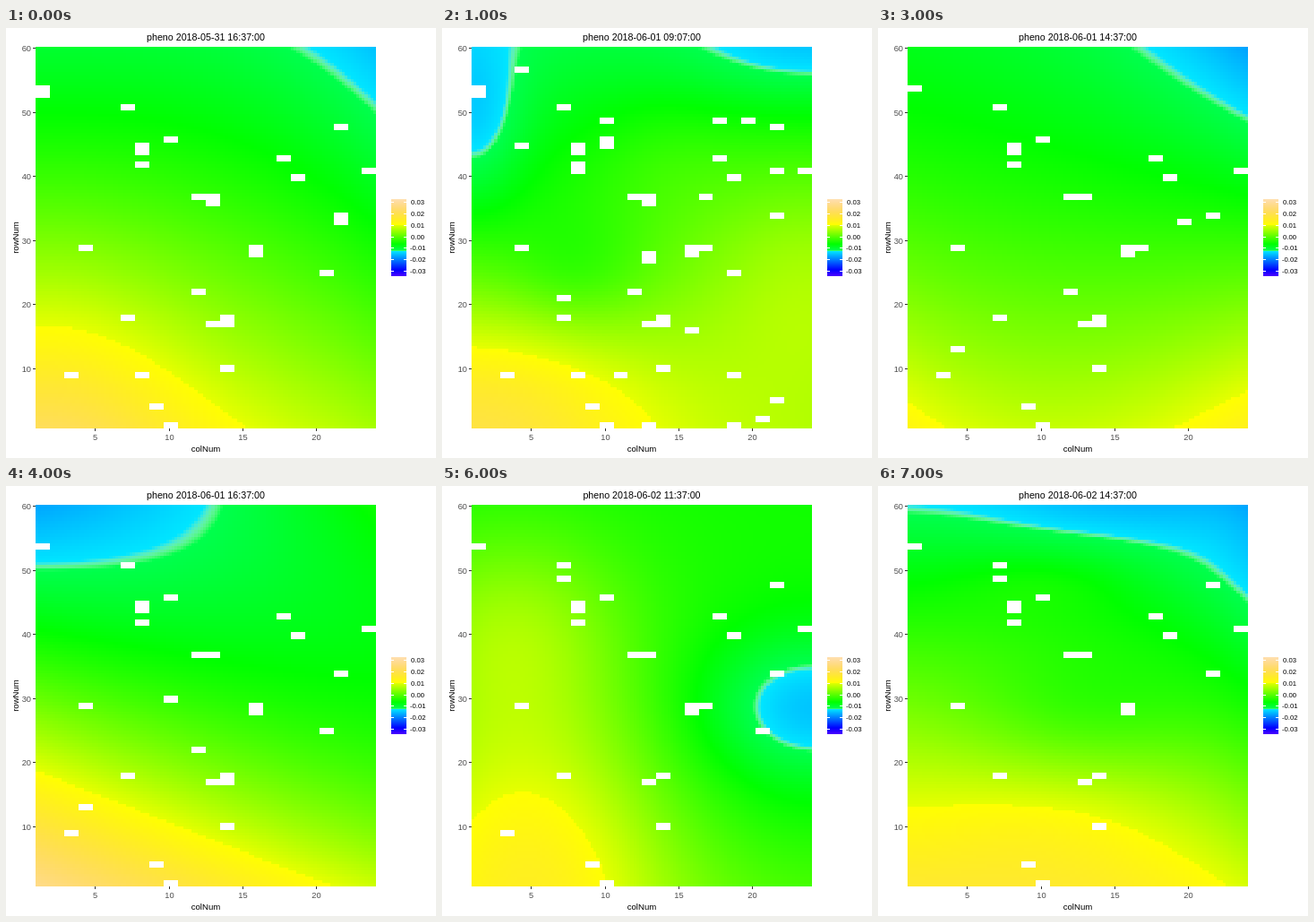
An HTML page with a canvas that plays this animation: 480 by 480 pixels, repeating every 8 s.

```html
<!DOCTYPE html>
<html lang="en">
<head>
<meta charset="utf-8">
<title>Field heat map</title>
<style>
  html, body { margin: 0; width: 100%; height: 100%; overflow: hidden; background: #fff; }
  canvas, svg { position: absolute; left: 0; top: 0; width: 480px; height: 480px; }
  text { font-family: "Liberation Sans", Arial, sans-serif; }
  .tick { font-size: 9.3px; fill: #4d4d4d; }
  .key { font-size: 7.7px; }
  .axis { font-size: 9.6px; text-anchor: middle; }
  #title { font-size: 10.7px; text-anchor: middle; }
</style>
</head>
<body>
<canvas id="map" width="480" height="480"></canvas>
<svg id="axes" viewBox="0 0 480 480">
  <text id="title" x="223" y="14"></text>
  <text class="axis" x="223" y="473">colNum</text>
  <text class="axis" transform="translate(14 234) rotate(-90)">rowNum</text>
</svg>
<script>
const HOLD = 1000, N = 120;
const X = 33.3, Y = 21.45, W = 380, H = 426, COLS = 24, ROWS = 60;

// Empty plots as "column,row"
const always = "1,54 7,51 8,45 8,44 8,42 10,46 18,43 19,40 24,41 12,37 13,37 " +
  "22,34 4,29 16,29 16,28 7,18 14,18 13,17 14,10 9,4 10,1 ";
const early = always + "12,22 14,17 3,9 ";

const { exp } = Math;
const bump = (x, y, w, h) => exp(-((x / w) ** 2) - (y / h) ** 2);

// Each field gives a scale position (0-100) at u to the right and v downward, both 0..1.
const scenes = [
  { time: "2018-05-31 16:37:00",
    gaps: early + "1,53 22,48 13,36 22,33 21,25 8,9",
    field: (u, v) => 36.5 - 8 * u ** 3 + 26 * v + (21 * exp(-((u / 0.45) ** 2)) + 5 * u) * v * v },
  { time: "2018-06-01 09:07:00",
    gaps: early + "1,53 4,57 10,49 18,49 20,49 22,48 4,45 10,45 8,41 22,41 13,36 17,37 17,29 " +
      "13,28 13,27 19,25 7,21 16,16 8,9 11,9 19,9 13,1 19,1 21,2 22,5",
    field: (u, v) => 35 + 22 * v
      + 12 * bump(u - 1, v - 0.57, 0.4, 0.37) - 7 * bump(u - 1, v, 0.35, 0.15)
      + 22 * bump(u, v - 1, 0.57, 0.33) - 9.5 * bump(u, v - 0.21, 0.155, 0.24)
      - 5 * bump(u - 0.3, v - 0.6, 0.2, 0.15) + 4 * bump(u - 0.55, v - 0.28, 0.25, 0.2) },
  { time: "2018-06-01 11:37:00", gaps: early + "22,48 17,29" },
  { time: "2018-06-01 14:37:00",
    gaps: early + "20,33 17,29 4,13",
    field: (u, v) => 39 - 5 * u - 9 * u ** 3 + (31 - 28 * u + 44 * u * u) * v
      - (7 + 10 * (1 - u) ** 4) * v * (1 - v) },
  { time: "2018-06-01 16:37:00",
    gaps: early + "10,30 21,25 4,13",
    field: (u, v) => 25.5 + 10 * u + 7.5 * u * u + (67 - 46 * u) * v - (26 + 18 * u) * v * (1 - v) },
  { time: "2018-06-02 09:07:00", gaps: always + "7,49 22,48 17,29 3,9" },
  { time: "2018-06-02 11:37:00",
    gaps: always + "7,49 22,48 17,29 21,25 3,9",
    field: (u, v) => 44 + 8 * v
      + 21 * bump(u - 0.17, v - 1, 0.42, 0.5) + 11 * bump(u - 0.12, v - 0.32, 0.33, 0.27)
      - 11 * bump(u - 1, v - 0.53, 0.32, 0.18) - 9 * bump(u - 1, v - 0.62, 0.52, 0.38) },
  { time: "2018-06-02 14:37:00",
    gaps: always + "7,49 22,48",
    field: (u, v) => 32.5 + 43 * v - 10.5 * u ** 3
      + 3.5 * bump(u - 1, v, 0.2, 0.15) - 3 * bump(u - 0.5, v, 0.3, 0.1)
      + 3 * bump(u - 0.4, v - 0.2, 0.25, 0.08) - 7 * bump(u - 0.5, v - 0.55, 0.35, 0.17)
      + 2 * bump(u - 0.4, v - 0.85, 0.3, 0.12) }
];

function hsv(h, s) {
  const ch = n => {
    const k = (n + h / 60) % 6;
    return 255 * (1 - s * Math.max(0, Math.min(k, 4 - k, 1)));
  };
  return [ch(5), ch(3), ch(1)];
}

// Blue to cyan, a pale seam, green to yellow, then sand.
function colour(t) {
  t = Math.max(0, Math.min(100, t));
  if (t < 32.3) return hsv(258 - 72 * t / 32.3, 1);
  if (t < 33.3) {
    const m = t - 32.3;
    return [380 * m * (1 - m), 229 + 26 * m, 255 - 178 * m];
  }
  if (t < 66.7) return hsv(138 - 72 * (t - 33.3) / 33.4, 1);
  const u = (t - 66.7) / 33.3;
  return hsv(60 - 24 * u, 1 - 0.7 * u);
}

function surface(field) {
  const cv = document.createElement("canvas");
  cv.width = cv.height = N;
  const c = cv.getContext("2d"), img = c.createImageData(N, N);
  for (let i = 0; i < N * N; i++) {
    const u = (i % N + 0.5) / N, v = (Math.floor(i / N) + 0.5) / N;
    img.data.set([...colour(field(u, v)), 255], i * 4);
  }
  c.putImageData(img, 0, 0);
  return cv;
}

const mean = (f, g) => (u, v) => (f(u, v) + g(u, v)) / 2;

scenes.forEach((s, i) => {
  s.image = surface(s.field || mean(scenes[i - 1].field, scenes[i + 1].field));
  s.cells = s.gaps.split(" ").map(p => p.split(",").map(Number));
});

const svg = document.getElementById("axes"), title = document.getElementById("title");
function add(tag, attrs, text = "") {
  const el = document.createElementNS("http://www.w3.org/2000/svg", tag);
  for (const k in attrs) el.setAttribute(k, attrs[k]);
  el.textContent = text;
  svg.append(el);
}
const rule = (d, stroke) => add("path", { d, stroke, "shape-rendering": "crispEdges" });

for (let r = 10; r <= ROWS; r += 10) {
  const y = Math.round(451.6 - 7.16 * r);
  rule(`M30 ${y + 0.5}h3`, "#333");
  add("text", { class: "tick", x: 28, y: y + 4, "text-anchor": "end" }, r);
}
for (let c = 5; c <= 20; c += 5) {
  const x = Math.round(17.2 + 16.45 * c);
  rule(`M${x + 0.5} 447v3`, "#333");
  add("text", { class: "tick", x: x + 0.5, y: 460, "text-anchor": "middle" }, c);
}

const ctx = document.getElementById("map").getContext("2d");
ctx.imageSmoothingEnabled = false;
for (let y = 191; y < 277; y++) {
  ctx.fillStyle = `rgb(${colour((276.5 - y) / 0.86).map(Math.round)})`;
  ctx.fillRect(430, y, 17, 1);
}
for (let v = 3; v >= -3; v--) {
  const y = Math.round(232.5 - 12.9 * v);
  rule(`M430 ${y + 0.5}h3M444 ${y + 0.5}h3`, "#fff");
  add("text", { class: "key", x: v < 0 ? 451 : 452, y: y + 3 }, (v / 100).toFixed(2));
}

const colX = c => Math.round(X + c * W / COLS);
const rowY = r => Math.round(Y + (ROWS - r) * H / ROWS);

function draw(s) {
  title.textContent = "pheno " + s.time;
  ctx.drawImage(s.image, Math.round(X), Math.round(Y), W, H);
  ctx.fillStyle = "#fff";
  for (const [c, r] of s.cells) {
    const x = colX(c - 1), y = rowY(r);
    ctx.fillRect(x, y, colX(c) - x, rowY(r - 1) - y);
  }
}

let shown = -1;
const start = performance.now();
function tick() {
  const i = Math.floor((performance.now() - start) / HOLD) % scenes.length;
  if (i !== shown) draw(scenes[shown = i]);
  requestAnimationFrame(tick);
}
tick();
</script>
</body>
</html>
```
